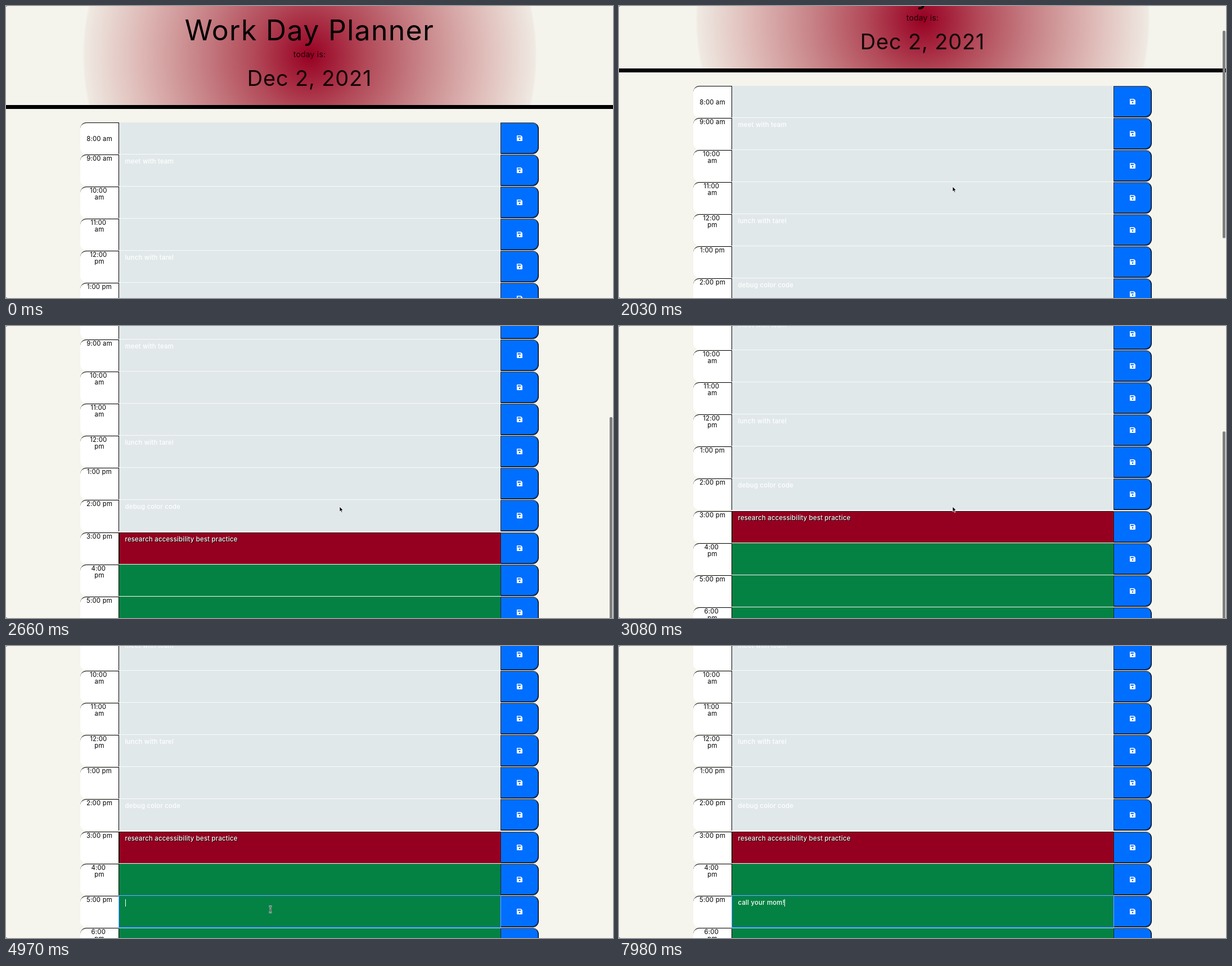
Animation of 1079x519 px, one loop 8000 ms. Source, as an HTML page:

```html
<!DOCTYPE html>
<html lang="en">
<head>
<meta charset="utf-8">
<title>Work Day Planner</title>
<style>
* { box-sizing: border-box; }
html, body { margin: 0; width: 100%; height: 100%; overflow: hidden; background: #f5f5ed; }
body { font-family: Inter, Roboto, sans-serif; color: #000; }
#stage { position: absolute; left: 0; top: 0; width: 1079px; height: 519px; overflow: hidden; background: #f5f5ed; }
#page { position: absolute; left: 0; top: 0; width: 1079px; height: 812px; }
header {
  position: absolute; width: 1079px; height: 183px; border-bottom: 7px solid #000;
  background: radial-gradient(circle 404px at 540px 88px,
    #980022, #b24a59 25%, #c88589 50%, #deb9b6 75%, #efe9e2 99%, #f4f4ed);
}
header div { position: absolute; left: 0; width: 100%; text-align: center; white-space: nowrap; }
.title { top: 13px; font-size: 50px; line-height: 60px; letter-spacing: 1.3px; }
.today { top: 76px; font-size: 14px; line-height: 20px; letter-spacing: .2px; color: #1c0408; }
.date { top: 103px; font-size: 38px; line-height: 50px; letter-spacing: .8px; color: #120606; }
.row { position: absolute; left: 132px; width: 815px; height: 57px; }
.hour {
  position: absolute; left: 0; top: 0; width: 69px; height: 56px; background: #fff;
  border-top: 1px solid #000; border-right: 1px solid #000; border-radius: 11px 0 0 11px;
  font-size: 11.4px; line-height: 11.5px; letter-spacing: .2px; text-align: center;
}
.hour span { position: absolute; left: 0; right: 0; top: 1px; white-space: nowrap; }
.row:first-child .hour span { top: 23px; }
.task {
  position: absolute; left: 69px; top: 0; width: 678px; height: 57px; padding-left: 10.5px;
  border-bottom: 1px solid #f8faf9; background: #e1e8ea; color: #fff;
  font-size: 11.4px; font-weight: 500; line-height: 24px; letter-spacing: .2px; white-space: pre;
}
.now { background: #950020; box-shadow: inset 0 1px #26000a, inset 1px 0 #3a000c; text-shadow: 1px 1px 1px #000; }
.next { background: #048243; }
.focus { outline: 1px solid #6db3ea; box-shadow: inset 0 0 0 1px #0a6aa8; border-color: #6db3ea; z-index: 1; }
.save {
  position: absolute; left: 747px; top: 0; width: 68px; height: 56px; background: #006fff;
  border: 1px solid; border-color: #4c4c4c #000 #000 #222; border-radius: 0 11px 11px 0;
  box-shadow: inset -1px -1px rgba(0, 0, 0, .45), inset 0 1px rgba(76, 76, 76, .5);
}
.save svg { position: absolute; left: 27.5px; top: 22px; }
.caret { display: inline-block; width: 1px; height: 13px; margin-right: -1px; vertical-align: -3px; background: #fff; }
#bar { position: absolute; left: 1073px; top: 0; width: 5px; height: 369px; border-radius: 3px; background: #7f7f7f; }
.mouse { position: absolute; left: 0; top: 0; overflow: visible; }
.corner { position: absolute; left: 0; width: 2px; height: 1px; background: #8a8a86; }
</style>
</head>
<body>
<div id="stage">
  <div id="page">
    <header>
      <div class="title">Work Day Planner</div>
      <div class="today">today is:</div>
      <div class="date">Dec 2, 2021</div>
    </header>
    <div id="rows"></div>
  </div>
  <div id="bar"></div>
  <svg id="arrow" class="mouse" width="10" height="14">
    <path d="M0 0V9L2 7.2 3.5 10.6 5 10 3.6 6.7H6.4Z" fill="#000" stroke="#fff" stroke-width=".8"/>
  </svg>
  <svg id="beam" class="mouse" width="10" height="14" fill="none">
    <defs><path id="ibar" d="M-2.5-5.5Q0-5.5 0-4V4Q0 5.5-2.5 5.5M2.5-5.5Q0-5.5 0-4M0 4Q0 5.5 2.5 5.5M-1.5 1.5H1.5"/></defs>
    <use href="#ibar" stroke="#fff" stroke-width="2.4"/>
    <use href="#ibar" stroke="#222"/>
  </svg>
  <i class="corner" style="top:0"></i>
  <i class="corner" style="top:518px"></i>
</div>
<script>
const LOOP = 8000, STEP = 70;
const $ = id => document.getElementById(id);

const rows = [
  ['8:00 am', ''], ['9:00 am', 'meet with team'], ['10:00|am', ''], ['11:00|am', ''],
  ['12:00|pm', 'lunch with tarel'], ['1:00 pm', ''], ['2:00 pm', 'debug color code'],
  ['3:00 pm', 'research accessibility best practice'], ['4:00|pm', ''], ['5:00 pm', ''], ['6:00|pm', '']
];
const icon = `<svg width="10" height="10" viewBox="0 0 10 10">
  <path d="M1 0H7.4L10 2.6V9Q10 10 9 10H1Q0 10 0 9V1Q0 0 1 0Z" fill="#fff"/>
  <path d="M1.5 1.5H7V3.7H1.5Z" fill="#006fff"/><circle cx="5" cy="6.8" r="1.4" fill="#006fff"/></svg>`;

$('rows').innerHTML = rows.map(([hour, task], i) => {
  const state = i < 7 ? '' : i === 7 ? 'now' : 'next';
  return `<div class="row" style="top:${Math.floor(207 + i * 57.15)}px">
    <div class="hour"><span>${hour.replace('|', '&nbsp;<br>')}</span></div>
    <div class="task ${state}">${task}</div>
    <div class="save">${icon}</div></div>`;
}).join('');

const field = document.querySelectorAll('.task')[9];
field.innerHTML = '<span></span><i class="caret"></i>';
const [typed, caret] = field.children;

// [time, value]
const scroll = [[1680, 0], [1820, 10], [2030, 65], [2380, 176], [2590, 229], [2800, 262], [2940, 274], [3080, 278]];
const fade = [[3430, 1], [3780, .1], [3850, 0]];
const mouseX = [[1190, 700], [1610, 593], [3430, 593], [3780, 531], [4550, 470]];
const mouseY = [[1190, 530], [1610, 321], [3430, 321], [3780, 371], [4550, 468]];

const message = 'call your mom!';
const keys = [5250, 5320, 5460, 5600, 5810, 5950, 6090, 6230, 6370, 6580, 6720, 6930, 7000, 7140];
const FOCUS = 4760;

function at(track, t) {
  const i = track.findIndex(p => p[0] > t);
  if (i === 0) return track[0][1];
  if (i < 0) return track[track.length - 1][1];
  const [a, v] = track[i - 1], [b, w] = track[i];
  return v + (w - v) * (t - a) / (b - a);
}

function draw(t) {
  const y = t < FOCUS ? Math.round(at(scroll, t)) : 277;
  $('page').style.transform = `translateY(${-y}px)`;
  $('bar').style.transform = `translateY(${y * .674}px)`;
  $('bar').style.opacity = t < 1680 ? 0 : at(fade, t);

  const place = `translate(${at(mouseX, t)}px,${at(mouseY, t)}px)`;
  const beam = t >= 3570;
  $('arrow').style.transform = $('beam').style.transform = place;
  $('arrow').style.display = t >= 1190 && !beam ? '' : 'none';
  $('beam').style.display = beam && t < keys[0] ? '' : 'none';

  const focused = t >= FOCUS;
  field.classList.toggle('focus', focused);
  typed.textContent = message.slice(0, keys.filter(k => k <= t).length);
  caret.style.visibility = focused && !(t >= 7630 && t < 7910) ? '' : 'hidden';
}

function tick() {
  const t = performance.now() % LOOP;
  draw(Math.floor(t / STEP) * STEP);
  requestAnimationFrame(tick);
}
draw(0);
tick();
</script>
</body>
</html>
```
